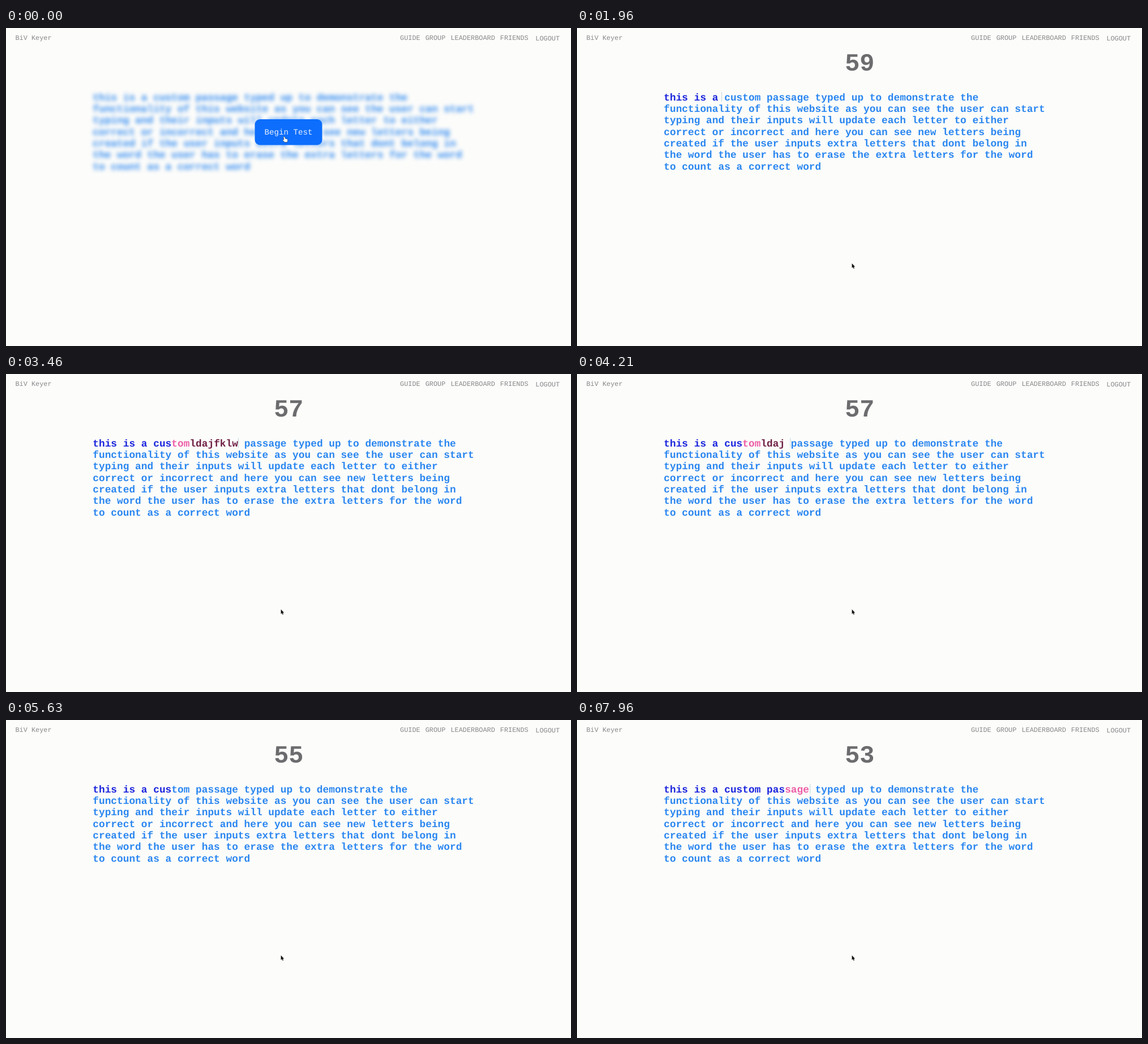
Animation of 998 by 561 pixels, one loop 8 s. Source, as an HTML page with a canvas:

```html
<!DOCTYPE html>
<html lang="en">
<head>
<meta charset="utf-8">
<title>Typing test</title>
<style>
  html, body { margin: 0; width: 100%; height: 100%; overflow: hidden; background: #fcfcfa; }
  canvas { display: block; }
</style>
</head>
<body>
<canvas id="stage" width="998" height="561"></canvas>
<script>
const ctx = document.getElementById('stage').getContext('2d');
const LOOP = 8000;
const CLICK = 200;
const TIMER_START = 1300;
const MONO = '"Liberation Mono", "Courier New", monospace';
const SIZE = 17.82, STEP = SIZE * 0.6001;
const LEFT = 153.3, TOP = 127.6, LEADING = 20.36;
const COLOR = { todo: '#2a86f0', right: '#1a24dd', wrong: '#ee5da6', extra: '#6f2044' };

const LINES = [
  'this is a custom passage typed up to demonstrate the',
  'functionality of this website as you can see the user can start',
  'typing and their inputs will update each letter to either',
  'correct or incorrect and here you can see new letters being',
  'created if the user inputs extra letters that dont belong in',
  'the word the user has to erase the extra letters for the word',
  'to count as a correct word'
];
const WORDS = LINES[0].split(' ');

// Keystrokes; "<" erases one letter.
const keys = [];
function press(start, gap, text) {
  [...text].forEach((key, i) => keys.push({ time: start + gap * i, key }));
}
press(1255, 75, 'this is a ');
press(2030, 90, 'cus');
press(2560, 80, 'ewpldajfklw');
press(3850, 118, '<'.repeat(11));
press(5800, 90, 'tom ');
press(6180, 90, 'pas');
press(6560, 80, 'kdjfldkajsf');
press(7553, 57, '<'.repeat(7));

const lerp = (a, b, p) => a + (b - a) * p;
const progress = (t, from, to) => Math.min(1, Math.max(0, (t - from) / (to - from)));
const easeInOut = p => p * p * (3 - 2 * p);
const easeOut = p => 1 - (1 - p) * (1 - p);

function write(text, x, y, size, color, weight = 'normal') {
  ctx.font = `${weight} ${size}px ${MONO}`;
  ctx.fillStyle = color;
  ctx.fillText(text, x, y);
}

function typedAt(t) {
  let text = '', before = 0, last = 0;
  for (const { time, key } of keys) {
    if (time > t) break;
    before = text.length;
    text = key === '<' ? text.slice(0, -1) : text + key;
    last = time;
  }
  return { text, before, last };
}

// Splits the first line into coloured runs.
function runsFor(typed) {
  const runs = [];
  const add = (text, color) => {
    const tail = runs[runs.length - 1];
    if (tail && tail.color === color) tail.text += text;
    else runs.push({ text, color });
  };
  const inputs = typed.split(' ');
  WORDS.forEach((word, w) => {
    const input = inputs[w] || '';
    if (w) add(' ', COLOR.todo);
    [...word].forEach((letter, i) => {
      add(letter, !input[i] ? COLOR.todo : input[i] === letter ? COLOR.right : COLOR.wrong);
    });
    if (input.length > word.length) add(input.slice(word.length), COLOR.extra);
  });
  return runs;
}

function drawPassage(typed) {
  let x = LEFT;
  for (const { text, color } of runsFor(typed)) {
    write(text, x, TOP, SIZE, color, 'bold');
    x += text.length * STEP;
  }
  LINES.slice(1).forEach((line, i) => {
    write(line, LEFT, TOP + LEADING * (i + 1), SIZE, COLOR.todo, 'bold');
  });
}

function drawCaret(t, { text, before, last }) {
  const idle = t - last;
  if (last && idle > 450 && idle % 1000 > 500) return;
  const column = lerp(before, text.length, easeOut(progress(idle, 0, 100)));
  ctx.fillStyle = 'rgba(70, 140, 170, 0.35)';
  ctx.fillRect(LEFT + column * STEP, 113, 1, 17);
}

function drawNav() {
  const grey = '#88888a';
  write('BiV Keyer', 16.4, 21, 11.88, grey);
  const links = { GUIDE: 696, GROUP: 740.7, LEADERBOARD: 785.4, FRIENDS: 872.8 };
  for (const label in links) write(label, links[label], 21, 11.88, grey);
  write('LOGOUT', 935.3, 22, 11.88, grey);
}

function drawButton() {
  ctx.fillStyle = '#0d6efd';
  ctx.beginPath();
  ctx.roundRect(439.5, 161, 119, 45.5, 9);
  ctx.fill();
  write('Begin Test', 456.4, 188, 14.2, '#e6f0ff');
}

function drawShape(x, y, path, fill, stroke) {
  ctx.save();
  ctx.translate(x, y);
  const shape = new Path2D(path);
  ctx.lineJoin = 'round';
  ctx.lineWidth = 1;
  ctx.strokeStyle = stroke;
  ctx.stroke(shape);
  ctx.fillStyle = fill;
  ctx.fill(shape);
  ctx.restore();
}

function drawPointer(t) {
  if (t < CLICK) {
    drawShape(488.3, 191.3, 'M2 .8Q3 -.2 3.8 1L4.8 4L8 4.8Q9.5 5.4 9 7.5L8.2 10H4L.8 6.8Q.6 5.5 2 5.8L3 6.4Z', '#fff', '#222');
    return;
  }
  const away = easeInOut(progress(t, 240, 540));
  const settle = easeOut(progress(t, 540, 760));
  const x = lerp(lerp(490, 481.4, away), 485.6, settle);
  const y = lerp(lerp(192, 387, away), 415.3, settle);
  drawShape(x, y, 'M0 0V8L1.8 6.4L3 9.2L4.4 8.6L3.2 5.9H5.6Z', '#111', '#fff');
}

function draw(t) {
  ctx.fillStyle = '#fcfcfa';
  ctx.fillRect(0, 0, 998, 561);
  ctx.textRendering = 'geometricPrecision';
  drawNav();

  const state = typedAt(t);
  if (t < CLICK) {
    ctx.filter = 'blur(3.7px)';
    drawPassage('');
    ctx.filter = 'none';
    drawButton();
  } else {
    drawPassage(state.text);
    drawCaret(t, state);
  }

  if (t >= TIMER_START) {
    const left = 59 - Math.floor((t - TIMER_START) / 1000);
    ctx.textAlign = 'center';
    write(String(left), 499.3, 74.6, 43.5, '#6c6c6f', 'bold');
    ctx.textAlign = 'left';
  }
  drawPointer(t);
}

const start = performance.now();
function tick() {
  draw((performance.now() - start) % LOOP);
  requestAnimationFrame(tick);
}
tick();
</script>
</body>
</html>
```
